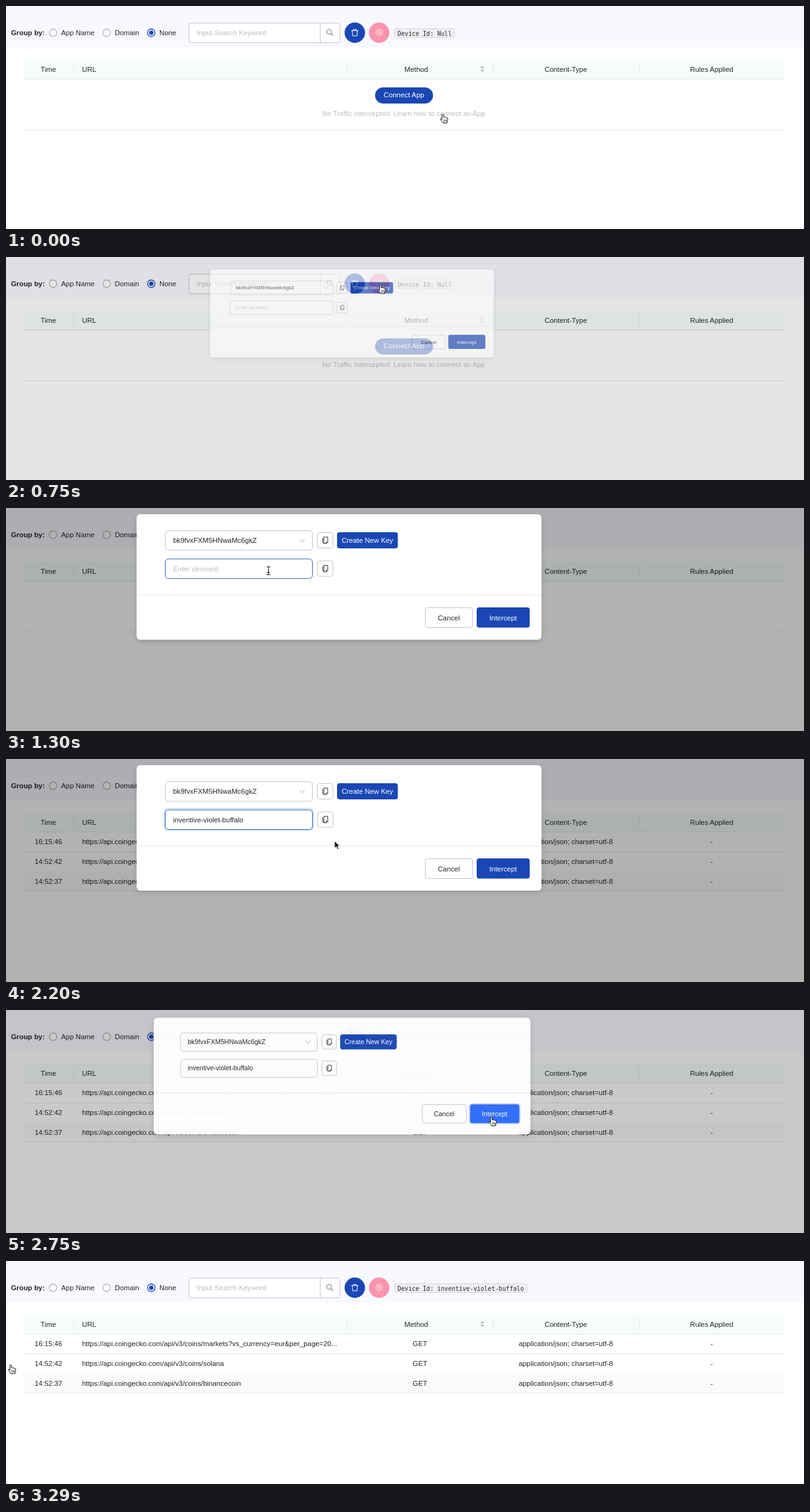
An HTML page for the animation above (3.37 s loop, 1280x359 px).

```html
<!DOCTYPE html>
<html lang="en">
<head>
<meta charset="utf-8">
<title>Traffic table</title>
<style>
  html, body { margin: 0; width: 100%; height: 100%; overflow: hidden; background: #fff; }
  svg { display: block; width: 1280px; height: 359px; cursor: default; }
  text { font: 11.35px "Liberation Sans", Arial, sans-serif; fill: #262626; white-space: pre; }
  .bold { font-weight: bold; }
  .mid { text-anchor: middle; }
  .pale { fill: #b9bdbf; }
  .white { fill: #fff; }
  .mono { font: 9.65px "DejaVu Sans Mono", monospace; }
  .icon { fill: none; stroke-linecap: round; stroke-linejoin: round; }
</style>
</head>
<body>
<svg id="stage" viewBox="0 0 1280 359"></svg>
<script>
const LOOP = 3370, BLUE = '#1a47b5', HOVER = '#2f6cfa', EDGE = '#bfc2c5';
const DEVICE = 'inventive-violet-buffalo';

// Markup helpers; text is placed by its vertical centre
const text = (x, y, s, cls = '', id = '') => `<text id="${id}" class="${cls}" x="${x}" y="${y + 4}">${s}</text>`;
const box = (x, y, w, h, r, fill, stroke = 'none', extra = '') =>
  `<rect x="${x}" y="${y}" width="${w}" height="${h}" rx="${r}" fill="${fill}" stroke="${stroke}" ${extra}/>`;
const dot = (x, y, r, fill, stroke = 'none') =>
  `<circle cx="${x}" cy="${y}" r="${r}" fill="${fill}" stroke="${stroke}" stroke-width="1.3"/>`;
const icon = (x, y, d, color, width = 1) =>
  `<path class="icon" transform="translate(${x} ${y})" d="${d}" stroke="${color}" stroke-width="${width}"/>`;
const rule = (y, x = 28, w = 1221) => box(x, y, w, 1, 0, '#e3e6e7');
const group = (id, ...parts) => `<g id="${id}">${parts.join('')}</g>`;

const radio = (x, label, on) =>
  dot(x, 43, 6, '#fff', on ? BLUE : '#b4b6b9') + (on ? dot(x, 43, 3.5, BLUE) : '') + text(x + 13, 43, label);

const row = (i, time, path) => {
  const y = 133.3 + i * 31.8;
  return (i === 2 ? box(28, 181, 1221, 31, 0, '#fafafa') : '') + rule(Math.round(y + 15.4)) +
    text(68, y, time, 'mid') + text(122, y, 'https://api.coingecko.com/api/v3/coins/' + path) +
    text(664, y, 'GET', 'mid') + text(898, y, 'application/json; charset=utf-8', 'mid') + text(1132, y, '-', 'mid');
};

const gearPath = () => {
  let d = '';
  for (let i = 0; i < 24; i++) {
    const a = (i + .5) * Math.PI / 12, r = i % 4 < 2 ? 5.4 : 4.3;
    d += `${i ? 'L' : 'M'}${(r * Math.sin(a)).toFixed(2)} ${(-r * Math.cos(a)).toFixed(2)}`;
  }
  return d + 'ZM1.8 0a1.8 1.8 0 1 1-3.6 0a1.8 1.8 0 1 1 3.6 0';
};

const copyButton = y => box(499.5, y - 12.5, 25, 25, 4, '#fff', EDGE) +
  icon(512, y, 'M-4-3.5V3.2q0 1 1 1H-1.5M-1.8-5.2H4V3L1.5 5.2H-1.8ZM4 3H1.5V5.2', '#333');

const toolbar = [
  box(0, 0, 1280, 66.5, 0, '#f8f9ff'),
  text(8, 43, 'Group by:', 'bold'),
  radio(75.5, 'App Name'), radio(161.5, 'Domain'), radio(233, 'None', true),
  box(293.5, 27.5, 242, 31.5, 3, '#fff', EDGE),
  box(503.5, 27.5, 1, 31.5, 0, EDGE),
  text(306, 43, 'Input Search Keyword', 'pale'),
  icon(519, 42.5, 'M3-1a3.8 3.8 0 1 1-7.6 0a3.8 3.8 0 1 1 7.6 0M2 1.8L5.3 5.2', '#777', 1.1),
  dot(559.5, 43, 16.4, BLUE),
  icon(559.5, 43, 'M-5.2-3.4H5.2M-2.4-3.4V-5.2H2.4V-3.4M-4-3.4L-3.5 5H3.5L4-3.4', '#fff'),
  dot(598.5, 43, 16.4, '#fa94ac'),
  icon(598.5, 42.5, gearPath(), '#fff', .9),
  box(623.5, 36.5, 96, 14, 2, '#f0f0f3', '#d3d3d7', 'id="chip"'),
  text(628, 43.5, '', 'mono', 'device')
];

const table = [
  box(28, 87, 1221, 30.5, 0, '#f6fbfc'), rule(117),
  ...[108, 547, 781, 1015].map(x => box(x, 93, 1, 17, 0, '#e4e8e9')),
  text(68, 101.5, 'Time', 'mid'), text(122, 101.5, 'URL'), text(658, 101.5, 'Method', 'mid'),
  text(898, 101.5, 'Content-Type', 'mid'), text(1132, 101.5, 'Rules Applied', 'mid'),
  '<path d="M760.5 100.3L764 96.5L767.5 100.3ZM760.5 102.5L764 106.3L767.5 102.5Z" fill="#b9bdbf"/>',
  group('empty',
    box(592, 131, 93, 26, 13, BLUE), text(638.3, 142.5, 'Connect App', 'mid white'),
    text(507, 172.5, 'No Traffic Intercepted. Learn how to connect an App', 'pale'), rule(199)),
  group('rows',
    row(0, '16:15:46', 'markets?vs_currency=eur&amp;per_page=20...'),
    row(1, '14:52:42', 'solana'), row(2, '14:52:37', 'binancecoin'))
];

const modal = [
  box(209.5, 10, 649.5, 202, 6, '#fff', 'none', 'filter="url(#shadow)"'),
  box(255.5, 36.5, 236, 31.5, 5, '#fff', EDGE),
  text(268, 52, 'bk9fvxFXM5HNwaMc6gkZ'),
  icon(475, 52, 'M-3.8-2L0 2.5L3.8-2', '#b9bdbf', 1.1),
  copyButton(52),
  box(531, 39, 97.5, 26, 4, BLUE), text(579.7, 52, 'Create New Key', 'mid white'),
  box(254, 80, 239, 34.5, 6, 'none', '#cfe3fb', 'id="glow" stroke-width="2.5"'),
  box(255.5, 82, 236, 31.5, 5, '#fff', EDGE, 'id="field"'),
  text(268, 97.5, 'Enter deviceId', 'pale', 'hint'), text(268, 97.5, '', '', 'typed'),
  box(0, 91, 1, 13, 0, '#222', 'none', 'id="caret"'),
  copyButton(97.5),
  rule(139.5, 209.5, 649.5),
  box(672.5, 160.5, 76, 32, 4, '#fff', EDGE), text(710.3, 176.5, 'Cancel', 'mid'),
  box(754, 159, 87, 34.5, 5, 'none', '#c3d5fb', 'id="ring" stroke-width="2"'),
  box(755, 160, 85, 32.5, 4, BLUE, 'none', 'id="intercept"'), text(797.3, 176.5, 'Intercept', 'mid white')
];

const HAND = 'M-1.3 9V1.2a1.3 1.3 0 0 1 2.6 0V5q1.2-1 2.4.3q1.4-.7 2.3.6q2-.5 2 1.3v2.3q0 1.5-1 2.8v2H.3' +
  'q-.8-1.8-2.3-3.5q-1.3-1.6-1.8-2.8q.7-1.6 2.5.4z';
const pointers = group('cursor',
  group('hand', `<path d="${HAND}" fill="#fff" stroke="#111"/>`, icon(0, 0, 'M2 9v3M4 9v3M6 9v3', '#111', .8)),
  group('arrow', '<path d="M0 0V11.6L2.7 9.1L4.6 13.4L6.6 12.5L4.8 8.4H8.3Z" fill="#111" stroke="#fff" stroke-width=".8"/>'),
  group('beam', icon(0, 0, 'M-2.5-6Q0-6 0-4.5Q0-6 2.5-6M0-4.5V5.5M-2.5 7Q0 7 0 5.5Q0 7 2.5 7M-1.5 3H1.5', '#111', 1.1)));

document.getElementById('stage').innerHTML =
  `<defs><filter id="shadow" x="-10%" y="-20%" width="120%" height="150%">
    <feDropShadow dx="0" dy="3" stdDeviation="5" flood-opacity=".15"/></filter></defs>` +
  toolbar.join('') + table.join('') +
  box(0, 0, 1280, 359, 0, '#000', 'none', 'id="mask"') + group('modal', ...modal) + pointers;

// Timelines: [time, ...values]
const MOVES = [[0, 700.5, 174], [450, 600.5, 44.5], [900, 600.5, 44.5], [1250, 421, 100.5], [1800, 421, 100.5],
  [2200, 527, 132], [2350, 560, 139], [2500, 778.5, 172], [3100, 778.5, 172], [3290, 7.5, 167]];
const KINDS = [[0, 'hand'], [100, 'arrow'], [400, 'hand'], [1000, 'arrow'], [1150, 'beam'], [1950, 'arrow'], [2450, 'hand']];
// scale, opacity, mask opacity
const ZOOM = [[700, .2, 0, 0], [750, .7, .65, .1], [800, .93, .93, .2], [850, 1, 1, .27], [900, 1, 1, .3],
  [2700, 1, 1, .3], [2750, .93, .965, .21], [2800, .6, .5, .12], [2850, .25, .06, .05], [2900, .2, 0, 0]];

const clamp = v => Math.min(1, Math.max(0, v));
const linear = p => p;
const smooth = p => p * p * (3 - 2 * p);
function sample(keys, t, ease) {
  let i = keys.findIndex(k => k[0] > t);
  if (i < 0) i = keys.length;
  const a = keys[Math.max(0, i - 1)], b = keys[Math.min(i, keys.length - 1)];
  const p = ease(clamp((t - a[0]) / (b[0] - a[0] || 1)));
  return a.slice(1).map((v, j) => v + (b[j + 1] - v) * p);
}

const $ = id => document.getElementById(id);
const set = (id, name, value) => $(id).setAttribute(name, value);
const show = (id, on) => set(id, 'visibility', on ? 'inherit' : 'hidden');

function draw(time) {
  const now = time % LOOP;
  const t = now >= 3290 ? 3290 : Math.min(3200, Math.floor(now / 50) * 50);

  const [scale, opacity, dim] = sample(ZOOM, t, linear);
  set('modal', 'transform', `translate(603 44) scale(${scale}) translate(-603 -44)`);
  set('modal', 'opacity', opacity);
  set('mask', 'opacity', dim);

  const loaded = t >= 2000;
  show('empty', !loaded);
  show('rows', loaded);

  const device = t >= 2700 ? DEVICE : 'Null';
  $('device').textContent = 'Device Id: ' + device;
  set('chip', 'width', 72.8 + device.length * 5.81);

  const focused = t >= 1300 && t < 2700;
  $('typed').textContent = DEVICE.slice(0, Math.round(clamp((t - 1300) / 500) * DEVICE.length));
  show('hint', t <= 1300);
  set('field', 'stroke', focused ? '#2f64ad' : EDGE);
  set('glow', 'opacity', focused ? clamp((t - 1300) / 200) : 0);
  show('caret', focused && t > 1300 && (t < 1900 || t >= 2400));
  set('caret', 'x', 268 + $('typed').getComputedTextLength());

  set('intercept', 'fill', t >= 2450 ? HOVER : BLUE);
  show('ring', t >= 2650);

  const [x, y] = sample(MOVES, t, smooth);
  const kind = KINDS.filter(k => k[0] <= t).pop()[1];
  set('cursor', 'transform', `translate(${x} ${y})`);
  for (const name of ['hand', 'arrow', 'beam']) show(name, name === kind);
}

const start = performance.now();
function tick() {
  draw(performance.now() - start);
  requestAnimationFrame(tick);
}
tick();
</script>
</body>
</html>
```
